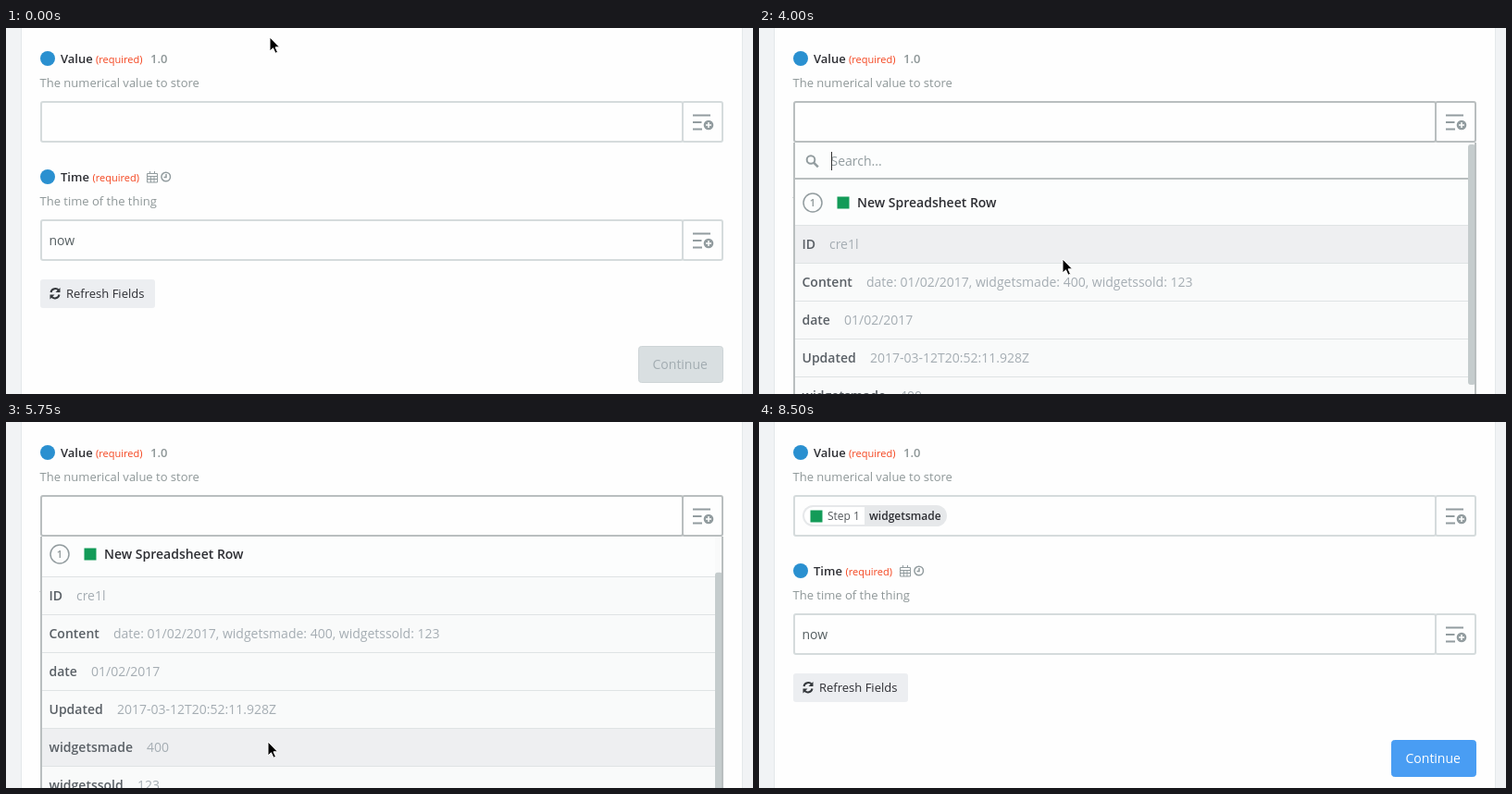
Write an HTML page that moves like this. It is 807x396 px and loops after 9 s.

```html
<!DOCTYPE html>
<html lang="en">
<head>
<meta charset="utf-8">
<title>Form field picker</title>
<style>
  html, body { margin: 0; width: 100%; height: 100%; overflow: hidden; background: #f1f3f5; }
  svg { display: block; }
  text { font: 14px "Open Sans", sans-serif; fill: #a5adb3; white-space: pre; }
  .small { font-size: 13px; }
  .label { font-size: 13px; font-weight: 600; fill: #2d2e33; }
  .required { font-size: 11px; font-weight: 500; fill: #f4451f; }
  .hint { font-size: 13px; fill: #8e9798; }
  .chip { font-size: 12px; fill: #55595d; }
  .strong { font-weight: 600; fill: #5a6066; }
  .dark { fill: #2d2e33; }
  .box { fill: #fefefe; stroke: #d5dbdc; stroke-width: 2; }
  .box.active { stroke: #b9bebf; }
  .line { fill: none; stroke: #929c9f; stroke-width: 2; }
</style>
</head>
<body>
<svg width="807" height="396" viewBox="0 0 807 396">
  <defs>
    <g id="insert">
      <path class="line" d="M742 94.5h19M742 102h9.500M742 109.500h10"/>
      <circle cx="759" cy="105" r="5.300" fill="#929c9f"/>
      <path d="M756 105h6M759 102v6" stroke="#fff" stroke-width="1.500"/>
    </g>
    <clipPath id="listArea"><rect x="37" y="124" width="738" height="272"/></clipPath>
  </defs>

  <rect x="16.500" y="-2" width="779" height="400" fill="#fefefe" stroke="#e4e8ea"/>

  <circle cx="45" cy="33" r="8" fill="#2a90d0"/>
  <text class="label" x="59" y="38">Value</text>
  <text class="required" x="97" y="38" font-weight="600">(required)</text>
  <text class="label" x="156" y="38" style="fill:#8e9798">1.0</text>
  <text class="hint" x="36.500" y="64">The numerical value to store</text>
  <rect id="addon" class="box" x="731" y="80" width="43" height="43" rx="2"/>
  <rect id="field" class="box" x="38" y="80" width="693" height="43" rx="2"/>
  <use href="#insert"/>

  <g id="token">
    <rect x="47" y="90" width="156" height="23" rx="11.500" fill="#e6e8ea"/>
    <path d="M114 92H58.500a9.500 9.500 0 0 0 0 19H114z" fill="#fff"/>
    <rect x="55.500" y="95.500" width="13" height="13" fill="#139b58"/>
    <text class="chip" x="74" y="106">Step 1</text>
    <text class="chip strong dark" x="119" y="106">widgetsmade</text>
  </g>
  <rect id="caret" y="89" width="1.500" height="26"/>

  <circle cx="45" cy="161" r="8" fill="#2a90d0"/>
  <text class="label" x="59" y="166">Time</text>
  <text class="required" x="93.500" y="166">(required)</text>
  <path class="line" style="stroke-width:1" d="M152.500 157.500h11v9.500h-11zM152.500 160.500h11M152.500 163.500h11M156.500 160v7M160 160v7M155.500 155v3M160.500 155v3"/>
  <path class="line" style="stroke-width:1.500" d="M177.500 161a4.800 4.800 0 1 1-9.600 0a4.800 4.800 0 1 1 9.600 0M173 158v3.500h-2.500"/>
  <text class="hint" x="36.500" y="192">The time of the thing</text>
  <rect class="box" x="38" y="208" width="693" height="43" rx="2"/>
  <rect class="box" x="731" y="208" width="43" height="43" rx="2"/>
  <use href="#insert" y="128"/>
  <text x="46.500" y="235" style="fill:#555e61">now</text>

  <rect x="37" y="272" width="124" height="31" rx="3" fill="#eceef1"/>
  <path class="line" style="stroke:#34383c" d="M48.500 286a4.800 4.800 0 0 1 8.500-2M57.500 288.500a4.800 4.800 0 0 1-8.500 2"/>
  <path d="M58.500 281v5h-5zM47.500 293.500v-5h5z" fill="#34383c"/>
  <text class="small dark" x="65" y="292">Refresh Fields</text>

  <rect id="button" x="683.500" y="344.500" width="91" height="39" rx="3"/>
  <text id="buttonText" x="698.500" y="369" font-weight="500">Continue</text>

  <g id="dropdown" clip-path="url(#listArea)">
    <rect x="38" y="110" width="736" height="300" fill="#f9fafa"/>
    <g id="list">
      <rect x="39" y="124" width="727" height="89" fill="#fcfdfd"/>
      <circle class="line" cx="56" cy="142.500" r="4.300"/>
      <path class="line" d="M59.300 145.800l4.500 4.500" style="stroke-width:2.500"/>
      <text x="77.500" y="149" style="fill:#929c9f">Search...</text>
      <rect id="searchCaret" x="78" y="134" width="1" height="20" fill="#333"/>
      <path d="M39 163h727" stroke="#b9bebf" stroke-width="2"/>
      <circle class="line" cx="58" cy="189" r="10" style="stroke-width:1.500"/>
      <text x="58" y="193" text-anchor="middle" style="font-size:11px;font-weight:600;fill:#8e9798">1</text>
      <rect x="84.500" y="182.500" width="13" height="13" fill="#139b58"/>
      <text class="strong dark" x="106" y="194">New Spreadsheet Row</text>
      <path d="M39 213.500h727" stroke="#dfe3e4"/>
      <rect id="hover" x="39" width="727" height="40" fill="#eeeff1"/>
      <g id="rows"></g>
    </g>
    <rect id="thumb" x="766" width="8" height="260" rx="3" fill="#c5cccd"/>
    <path d="M38 120v290M774 120v290" stroke="#b9bebf" stroke-width="2"/>
  </g>

  <path id="cursor" d="M0 0V15L3.500 11.800L6 17.300L8.500 16.200L6 10.800H10.500Z" fill="#000" stroke="#fff"/>
</svg>
<script>
const LOOP = 9000, STEP = 250, ROW_TOP = 214, ROW_HEIGHT = 41;
const el = id => document.getElementById(id);
const set = (id, attrs) => {
  for (const name in attrs) el(id).setAttribute(name, attrs[name]);
};
const show = (id, on) => el(id).style.display = on ? '' : 'none';

const rows = [
  ['ID', 76, 'cre1l'],
  ['Content', 116, 'date: 01/02/2017, widgetsmade: 400, widgetssold: 123'],
  ['date', 92, '01/02/2017'],
  ['Updated', 120, '2017-03-12T20:52:11.928Z'],
  ['widgetsmade', 152, '400'],
  ['widgetssold', 142, '123']
];
el('rows').innerHTML = rows.map(([name, x, value], i) => {
  const y = ROW_TOP + i * ROW_HEIGHT;
  return `<text class="strong" x="46.500" y="${y + 25}">${name}</text>
    <text x="${x}" y="${y + 25}">${value}</text>
    <path d="M39 ${y + 40.5}h727" stroke="#dfe3e4"/>`;
}).join('');

// Keys: time, then values
const cursorKeys = [
  [0, 285, 10], [750, 148, 110], [1250, 148, 110], [2500, 755, 107],
  [3250, 755, 107], [4000, 328, 250], [4750, 328, 250], [5000, 307, 317],
  [5750, 283, 346], [6500, 283, 346], [7500, 640, 141], [7750, 760, 33]
];
const scrollKeys = [[4000, 0], [4250, 3], [4500, 17], [5000, 46]];

function sample(keys, t) {
  const next = keys.findIndex(key => key[0] > t);
  if (next === 0) return keys[0].slice(1);
  if (next < 0) return keys[keys.length - 1].slice(1);
  const a = keys[next - 1], b = keys[next];
  const p = (t - a[0]) / (b[0] - a[0]);
  const eased = p * p * (3 - 2 * p);
  return a.slice(1).map((v, i) => v + (b[i + 1] - v) * eased);
}

function draw() {
  const t = Math.floor(performance.now() % LOOP / STEP) * STEP;
  const [x, y] = sample(cursorKeys, t);
  const [scroll] = sample(scrollKeys, t);
  const open = t >= 3000 && t < 6500;
  const filled = t >= 6500;
  const focused = t >= 1250 && t < 8500;
  const evenBlink = t % 1000 < 500;

  set('field', { class: focused ? 'box active' : 'box' });
  set('addon', { class: t >= 2500 && t < 6500 ? 'box active' : 'box' });
  el('addon').style.fill = t >= 2250 && t < 3500 ? '#f5f6f6' : '';
  show('token', filled);
  show('caret', focused && !open && evenBlink === filled);
  set('caret', { x: filled ? 203.5 : 46.5 });

  set('button', filled ? { fill: '#499df3', stroke: '#499df3' } : { fill: '#d9dfe1', stroke: '#cdd4d6' });
  el('buttonText').style.fill = filled ? '#fff' : '#a2acb1';

  show('dropdown', open);
  show('searchCaret', evenBlink);
  set('list', { transform: `translate(0 ${-Math.round(scroll)})` });
  set('thumb', { y: 126 + scroll * 0.8 });
  // The highlight trails the scroll by one step
  const row = Math.floor((y + sample(scrollKeys, t - STEP)[0] - ROW_TOP) / ROW_HEIGHT);
  show('hover', row >= 0);
  set('hover', { y: ROW_TOP + row * ROW_HEIGHT });

  show('cursor', t < 8000);
  set('cursor', { transform: `translate(${Math.round(x)} ${Math.round(y)})` });
  requestAnimationFrame(draw);
}
draw();
</script>
</body>
</html>
```
